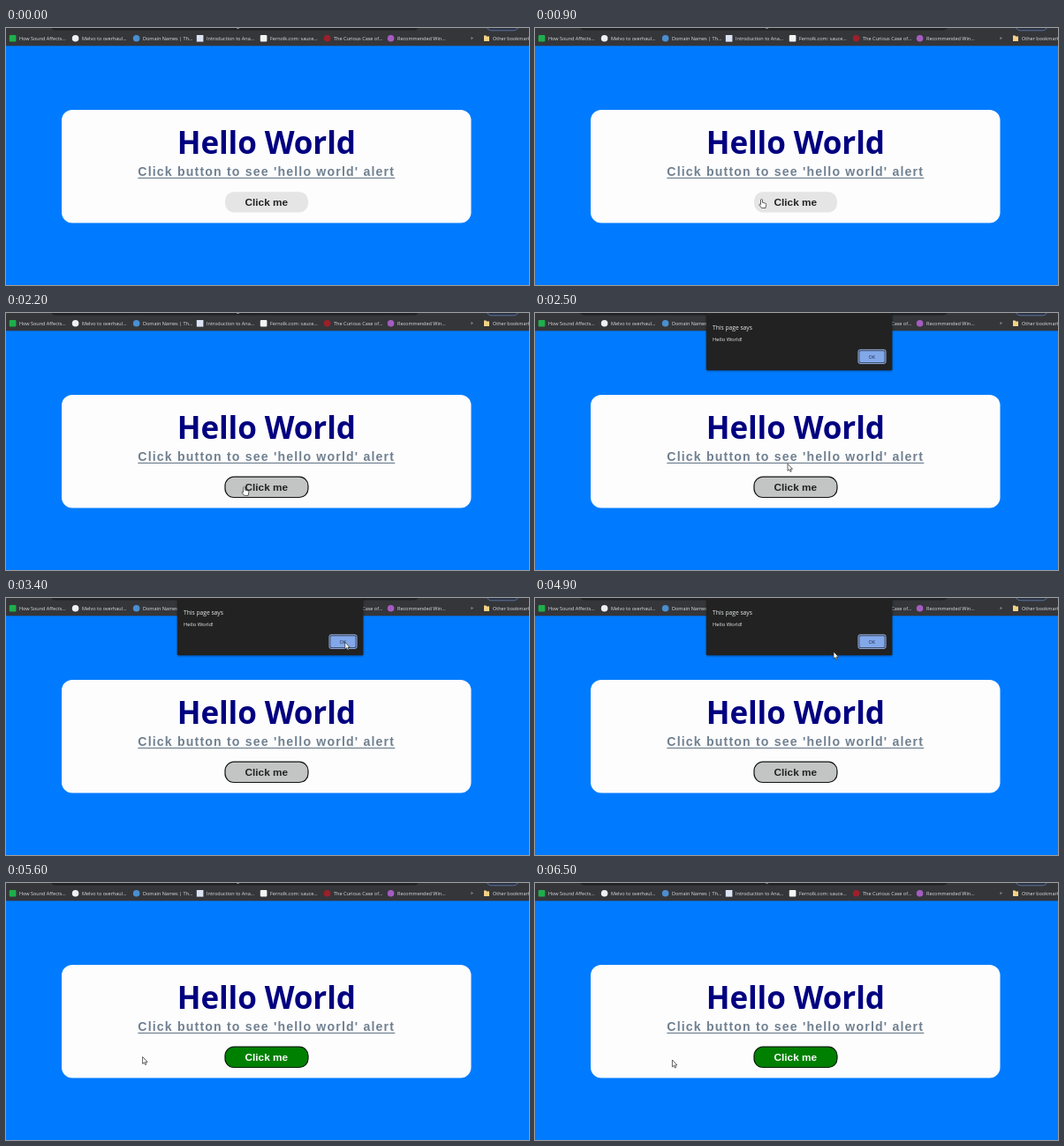
An HTML page that plays this animation: 592 px wide and 292 px high, repeating every 7000 ms.

```html
<!DOCTYPE html>
<html lang="en">
<head>
<meta charset="utf-8">
<title>Hello World alert</title>
<style>
  html, body { margin: 0; width: 100%; height: 100%; overflow: hidden; background: #007bff; }
  svg { display: block; width: 592px; height: 292px; }
  text { font-family: "Open Sans", "Noto Sans", sans-serif; white-space: pre; }
  .arial { font-family: "Liberation Sans", Arial, sans-serif; font-weight: 700; }
  .mid { text-anchor: middle; }
  .bar text { font-size: 5.5px; fill: #dfe0e3; }
  .dialog text { fill: #e8eaed; }
  .cursor path { stroke: #222; stroke-width: .7; stroke-linejoin: round; fill: #fff; }
</style>
</head>
<body>
<svg viewBox="0 0 592 292">
  <defs>
    <filter id="shadow" x="-10%" y="-20%" width="120%" height="150%">
      <feDropShadow dx="0" dy="1" stdDeviation="1.2" flood-color="#000" flood-opacity=".45"/>
    </filter>
  </defs>

  <rect width="592" height="292" fill="#007bff"/>

  <g class="bar">
    <rect width="592" height="20.3" fill="#35363a"/>
    <rect x="50" y="-10" width="418" height="12.6" rx="6" fill="#202124"/>
    <rect x="544" y="-9" width="36" height="11.8" rx="5.5" fill="#2b3343" stroke="#6f8fc4" stroke-width=".7"/>
    <rect x="261" y="0" width="3" height=".8" fill="#8b8d91"/>
    <g id="bookmarks"></g>
    <text x="526" y="13.4">»</text>
    <path d="M541 8.6h2.4l.8 1h2.8v5.4h-6z" fill="#f3d286"/>
    <text x="551" y="13.6">Other bookmarks</text>
  </g>

  <rect x="63" y="93" width="463.5" height="128.6" rx="12" fill="#fdfdfe"/>
  <text class="mid" x="294.8" y="142.5" font-size="35" font-weight="700" letter-spacing="-.1" fill="#000080">Hello World</text>
  <text class="arial" x="149.3" y="168.4" font-size="14.1" letter-spacing="1.18" fill="#708090">Click button to see 'hello world' alert</text>
  <rect x="149.3" y="169.9" width="291" height="1.2" fill="#708090"/>

  <rect id="button" x="248" y="186.2" width="94" height="23.3" rx="10"/>
  <text id="label" class="arial mid" x="294.8" y="202" font-size="11.8">Click me</text>

  <g id="dialog" class="dialog">
    <rect x="193.8" y="-8" width="210.6" height="73" rx="1.5" fill="#202124" filter="url(#shadow)"/>
    <text x="201" y="18.8" font-size="6.7">This page says</text>
    <text x="201" y="32.2" font-size="5.9">Hello World!</text>
    <rect x="366" y="41.8" width="31" height="15.6" rx="1.8" fill="#33415c" stroke="#a9c5f5" stroke-width=".9"/>
    <rect x="367.4" y="43.2" width="28.2" height="12.8" rx="1.2" fill="#82a8ea"/>
    <text class="mid" x="381.4" y="51.6" font-size="5.5" style="fill:#202b44">OK</text>
  </g>

  <g id="cursor" class="cursor">
    <path id="arrow" d="M0 0V8L1.8 6.4L3 9.1L4.3 8.5L3.1 5.9H5.5Z"/>
    <path id="hand" d="M-1 .8Q0-.6 1 .8V4L4.4 4.8Q5.3 5 5.2 6.2L4.5 10.2H0L-2.8 6.4Q-2.4 5.2-1 6.3Z"/>
  </g>
</svg>

<script>
const LOOP = 7000, STEP = 100;
const PRESS = 2100, OPEN = 2300, CLOSE = 5100;
const el = id => document.getElementById(id);

// text x, icon colour, icon roundness, title
const bookmarks = [
  [15, "#1fae4b", 1, "How Sound Affects..."],
  [86, "#eef0f2", 4, "Melvo to overhaul..."],
  [155, "#4a8fd0", 4, "Domain Names | Th..."],
  [227, "#dbe3f3", 0, "Introduction to Ana..."],
  [299, "#f4f4f4", 1, "Fernolk.com: sauce..."],
  [371, "#9c2029", 4, "The Curious Case of..."],
  [443, "#a45cc0", 4, "Recommended Win..."]
];
el("bookmarks").innerHTML = bookmarks.map(([x, color, round, title]) =>
  `<rect x="${x - 11.2}" y="8" width="7.6" height="7.6" rx="${round}" fill="${color}"/>
   <text x="${x}" y="13.6">${title}</text>`).join("");

// time, x, y of the pointer tip
const path = [
  [500, 168, 205], [700, 215, 200], [900, 256.5, 194.3], [1200, 263, 196],
  [1300, 263, 196], [1500, 266, 197], [1900, 266, 197], [2100, 269.5, 197.3],
  [2400, 270, 197], [2700, 318, 120], [3100, 376, 58], [3400, 383.8, 50.2],
  [3600, 383.8, 50.2], [4000, 383, 50.6], [4200, 383, 50.6], [4500, 382.5, 50],
  [4700, 382.5, 50], [4800, 378, 51], [4900, 338, 61], [5000, 236, 135],
  [5100, 154.7, 192], [5300, 154.2, 196], [5400, 154.2, 196],
  [6000, 155.4, 200.4], [6400, 155.4, 200.4], [6500, 155.4, 201]
];

function pointerAt(t) {
  const i = path.findIndex(key => key[0] > t);
  if (i < 0) return path.at(-1).slice(1);
  const [t0, x0, y0] = path[i - 1], [t1, x1, y1] = path[i];
  const k = (t - t0) / (t1 - t0);
  return [x0 + (x1 - x0) * k, y0 + (y1 - y0) * k];
}

function set(id, attrs) {
  for (const name in attrs) el(id).setAttribute(name, attrs[name]);
}

function drawButton(t) {
  const state = t < PRESS ? ["#e5e5e5", "none", "#222"]
    : t < CLOSE ? ["#c3c5c5", "#111", "#222"]
    : ["#008000", "#001a00", "#fff"];
  set("button", { fill: state[0], stroke: state[1], "stroke-width": 1.2 });
  set("label", { fill: state[2] });
}

function drawDialog(t) {
  let opacity = 0, shift = 0;
  if (t === OPEN) [opacity, shift] = [.5, -4];
  else if (t > OPEN && t < CLOSE) opacity = 1;
  else if (t === CLOSE) [opacity, shift] = [.27, -6.3];
  set("dialog", { opacity, transform: `translate(0 ${shift})` });
}

function drawCursor(t) {
  const shown = t >= path[0][0];
  set("cursor", { visibility: shown ? "visible" : "hidden" });
  if (!shown) return;
  const [x, y] = pointerAt(t);
  const overButton = t < OPEN && x > 248 && y > 186;
  set("cursor", { transform: `translate(${x} ${y})` });
  set("arrow", { display: overButton ? "none" : "inline" });
  set("hand", { display: overButton ? "inline" : "none" });
}

const start = performance.now();
function draw() {
  const t = Math.floor((performance.now() - start) % LOOP / STEP) * STEP;
  drawButton(t);
  drawDialog(t);
  drawCursor(t);
  requestAnimationFrame(draw);
}
draw();
</script>
</body>
</html>
```
